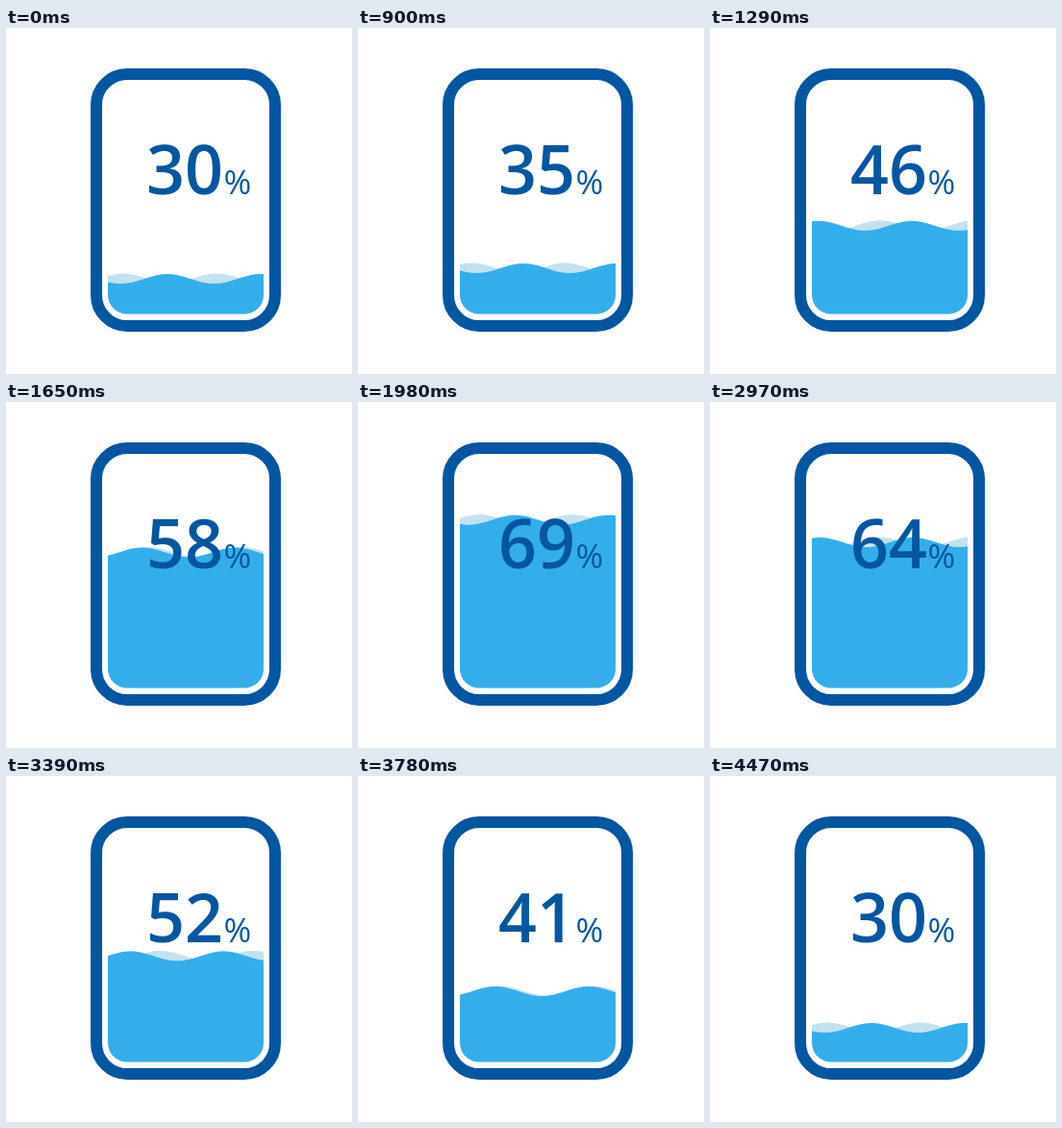
Write an HTML page that moves like this. It is 360x360 px and loops after 4500 ms.

```html
<!DOCTYPE html>
<html lang="en">
<head>
<meta charset="utf-8">
<title>Tank level</title>
<style>
  html, body { margin: 0; width: 100%; height: 100%; overflow: hidden; background: #fff; }
  svg { display: block; width: 100%; height: 100%; }
  text { font: 600 70px "Open Sans", "Noto Sans", sans-serif; fill: #0556a0; }
  .unit { font-size: 35px; font-weight: 500; }
</style>
</head>
<body>
<svg viewBox="0 0 360 360">
  <clipPath id="tank"><rect x="106" y="60" width="162" height="237.5" rx="20"/></clipPath>
  <rect x="94" y="48" width="186" height="262" rx="32" fill="#fff" stroke="#0556a0" stroke-width="12"/>
  <g clip-path="url(#tank)">
    <path id="back" fill="#c3e1ee"/>
    <path id="front" fill="#34aeea"/>
  </g>
  <text id="count" x="146" y="172.5">30</text>
  <text class="unit" x="226.5" y="172.5">%</text>
</svg>
<script>
const LOOP = 4500, HOLD = 150, STEP = 30;
const WAVELENGTH = 97, AMPLITUDE = 5;
const $ = id => document.getElementById(id);

// time in ms, height of the water line, percentage
const keys = [
  [0, 261, 30], [500, 261, 30], [900, 250, 35.5], [1650, 156.5, 58.5],
  [2250, 109, 74.5], [2430, 111, 73.5], [2970, 146, 64.5],
  [3780, 224, 41.5], [4470, 262, 30], [4500, 262, 30]
];

function slope(i, col) {
  const a = keys[i], b = keys[i + 1];
  return a && b ? (b[col] - a[col]) / (b[0] - a[0]) : 0;
}

// harmonic mean of both neighbours, flat at turning points
function tangent(i, col) {
  const p = slope(i - 1, col), q = slope(i, col);
  return p * q > 0 ? 2 * p * q / (p + q) : 0;
}

function valueAt(t, col) {
  const i = keys.findIndex((k, n) => n === keys.length - 2 || t < keys[n + 1][0]);
  const a = keys[i], b = keys[i + 1], span = b[0] - a[0];
  const u = (t - a[0]) / span, v = 1 - u;
  return a[col] * v * v * (1 + 2 * u) + b[col] * u * u * (3 - 2 * u)
    + span * u * v * (v * tangent(i, col) - u * tangent(i + 1, col));
}

function wave(crest, level) {
  let d = "M104 300";
  for (let x = 104; x <= 270; x += 2) {
    const y = level - AMPLITUDE * Math.cos((x - crest) / WAVELENGTH * 2 * Math.PI);
    d += `L${x} ${y.toFixed(2)}`;
  }
  return d + "V300Z";
}

function draw(t) {
  const s = Math.max(0, t - HOLD + STEP) / 1000;
  const drift = s * (154.1 - 34.05 * s + 3.22 * s * s);   // slows down over the loop
  const level = valueAt(t, 1);
  $("front").setAttribute("d", wave(168 + drift, level));
  $("back").setAttribute("d", wave(122 - drift, level - 0.5));
  $("count").textContent = Math.floor(valueAt(t, 2) + 1e-6);
}

const start = performance.now();
function tick() {
  const t = (performance.now() - start) % LOOP;
  draw(t < HOLD ? 0 : Math.floor(t / STEP) * STEP);
  requestAnimationFrame(tick);
}
tick();
</script>
</body>
</html>
```
